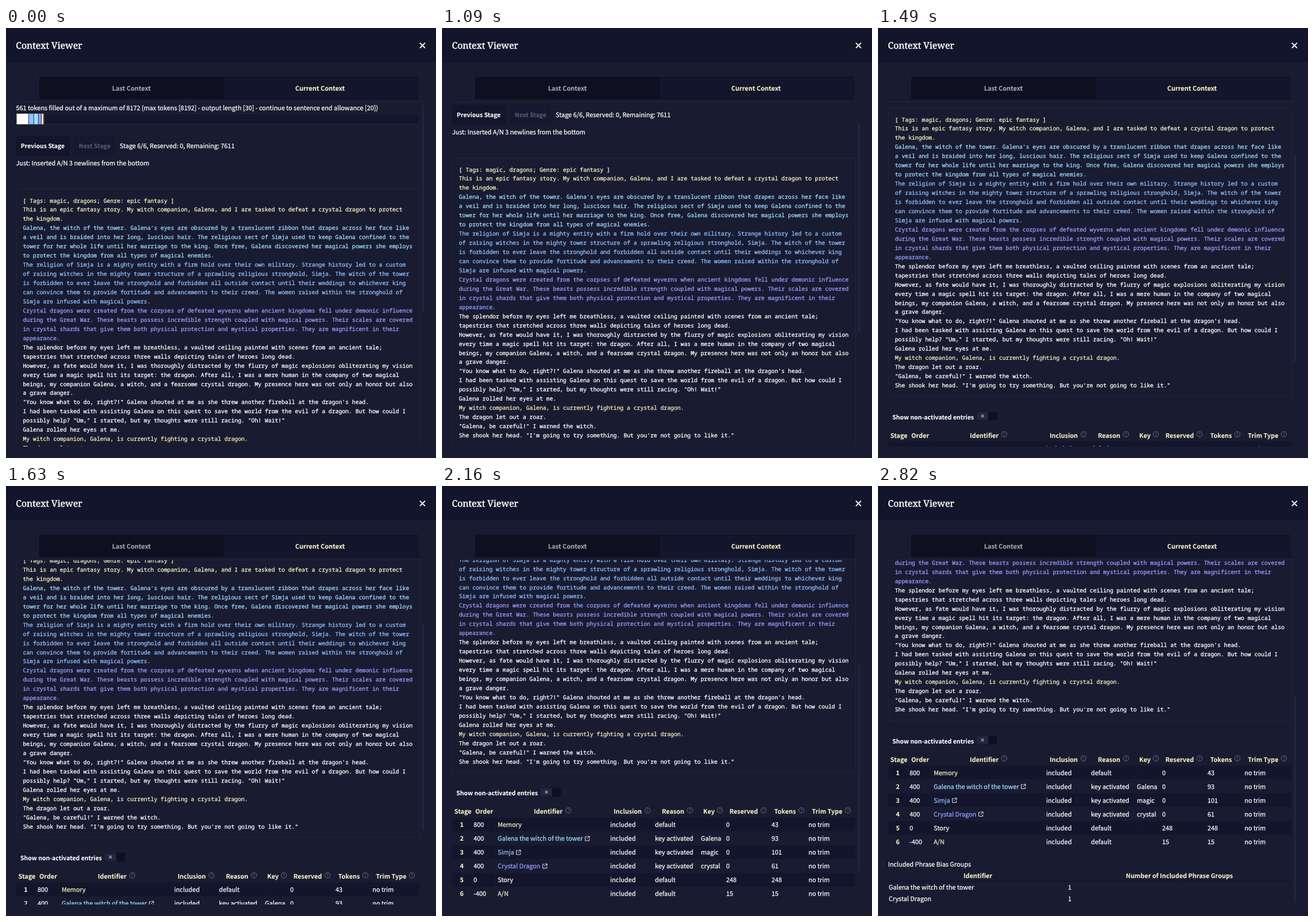
Animation, 749 px wide and 748 px high, one loop 3.52 s. Source, as an HTML page:

```html
<!DOCTYPE html>
<html lang="en">
<head>
<meta charset="utf-8">
<title>Context Viewer</title>
<style>
html, body { margin: 0; width: 100%; height: 100%; overflow: hidden; background: #191b31; }
svg { display: block; width: 100%; height: 100%; }
text {
  font: 10.88px "Noto Sans CJK JP", "Noto Sans CJK SC", "Noto Sans CJK", "Open Sans", sans-serif;
  stroke-width: 0.25px;
  text-rendering: geometricPrecision;
}
.mono { font: 9.758px "Noto Sans Mono", "DejaVu Sans Mono", monospace; stroke-width: 0.3px; }
.title { font: 15.8px "Noto Serif", serif; stroke-width: 0.45px; }
.semi { font-size: 10.5px; font-weight: 700; stroke-width: 0.1px; }
.tab { font-size: 11px; font-weight: 700; stroke-width: 0.1px; }
.head { font-weight: 700; stroke-width: 0.1px; }
.mid { text-anchor: middle; }
.hint { font-size: 7.5px; text-anchor: middle; stroke-width: 0; }
</style>
</head>
<body>
<svg id="stage" viewBox="0 0 749 748">
  <defs><clipPath id="view"><rect x="17" y="129" width="704.5" height="599"/></clipPath></defs>
</svg>
<script>
const BG = '#191b31', PANEL = '#13152c', DARK = '#0e0f21', LINE = '#22253f';
const CREAM = '#f5f3c2', SKY = '#9cdcff', BLUE = '#8fc0ff', INDIGO = '#979dff', NOTE = '#f2ebbd', WHITE = '#fff';

const stage = document.getElementById('stage');

function add(parent, tag, attrs, content) {
  const el = document.createElementNS('http://www.w3.org/2000/svg', tag);
  for (const k in attrs) el.setAttribute(k, attrs[k]);
  if (content !== undefined) el.textContent = content;
  parent.appendChild(el);
  return el;
}
const rect = (p, x, y, width, height, fill, more) =>
  add(p, 'rect', { x, y, width, height, fill, ...more });
const path = (p, d, stroke, width) =>
  add(p, 'path', { d, stroke, 'stroke-width': width, fill: 'none' });
const label = (p, x, y, str, cls = '', color = WHITE) =>
  add(p, 'text', { x, y, class: cls, fill: color, stroke: color }, str);

// Fixed chrome
rect(stage, 0, 0, 749, 748, BG);
rect(stage, 0, 0, 749, 60, PANEL);
label(stage, 17.3, 36, 'Context Viewer', 'title');
path(stage, 'M720.9 25.9l9 9m0-9l-9 9', WHITE, 2);
rect(stage, 58, 85, 320, 39, DARK);
rect(stage, 378, 85.5, 339.5, 38, PANEL, { stroke: DARK });
label(stage, 218.5, 108.8, 'Last Context', 'tab mid', '#a7a7ae');
label(stage, 547, 108.8, 'Current Context', 'tab mid', CREAM);
rect(stage, 17, 128, 714, 1, LINE);
const thumb = rect(stage, 724.5, 133, 3.5, 361, LINE, { rx: 1 });

const clip = add(stage, 'g', { 'clip-path': 'url(#view)' });
const page = add(clip, 'g', {});

// Token bar
label(page, 17.5, 142.5, '561 tokens filled out of a maximum of 8172 (max tokens [8192] - output length [30] - continue to sentence end allowance [20])');
rect(page, 18, 149, 702, 18.5, PANEL, { stroke: LINE });
let barX = 18.5;
for (const [tokens, color] of [[248, WHITE], [101, BLUE], [93, SKY], [61, INDIGO], [43, CREAM], [15, NOTE]]) {
  const w = tokens * 0.0865;
  rect(page, barX, 149, w, 18.5, DARK);
  rect(page, barX, 149, w - 0.8, 18.5, color);
  barX += w;
}

// Stage controls
rect(page, 17.5, 187, 94, 36, PANEL);
rect(page, 118, 187, 72, 36, '#161830');
label(page, 25.8, 208.8, 'Previous Stage', 'semi');
label(page, 126.8, 208.8, 'Next Stage', 'semi', '#5a5b6b');
label(page, 198, 208.8, 'Stage 6/6, Reserved: 0, Remaining: 7611');
label(page, 17.5, 238.6, 'Just: Inserted A/N 3 newlines from the bottom');

// Story
rect(page, 17.5, 280.5, 703, 501.5, BG, { stroke: LINE });
const story = [
  [CREAM, `[ Tags: magic, dragons; Genre: epic fantasy ]
This is an epic fantasy story. My witch companion, Galena, and I are tasked to defeat a crystal dragon to protect
the kingdom.`],
  [SKY, `Galena, the witch of the tower. Galena's eyes are obscured by a translucent ribbon that drapes across her face like
a veil and is braided into her long, luscious hair. The religious sect of Simja used to keep Galena confined to the
tower for her whole life until her marriage to the king. Once free, Galena discovered her magical powers she employs
to protect the kingdom from all types of magical enemies.`],
  [BLUE, `The religion of Simja is a mighty entity with a firm hold over their own military. Strange history led to a custom
of raising witches in the mighty tower structure of a sprawling religious stronghold, Simja. The witch of the tower
is forbidden to ever leave the stronghold and forbidden all outside contact until their weddings to whichever king
can convince them to provide fortitude and advancements to their creed. The women raised within the stronghold of
Simja are infused with magical powers.`],
  [INDIGO, `Crystal dragons were created from the corpses of defeated wyverns when ancient kingdoms fell under demonic influence
during the Great War. These beasts possess incredible strength coupled with magical powers. Their scales are covered
in crystal shards that give them both physical protection and mystical properties. They are magnificent in their
appearance.`],
  [WHITE, `The splendor before my eyes left me breathless, a vaulted ceiling painted with scenes from an ancient tale;
tapestries that stretched across three walls depicting tales of heroes long dead.
However, as fate would have it, I was thoroughly distracted by the flurry of magic explosions obliterating my vision
every time a magic spell hit its target: the dragon. After all, I was a mere human in the company of two magical
beings, my companion Galena, a witch, and a fearsome crystal dragon. My presence here was not only an honor but also
a grave danger.
"You know what to do, right?!" Galena shouted at me as she threw another fireball at the dragon's head.
I had been tasked with assisting Galena on this quest to save the world from the evil of a dragon. But how could I
possibly help? "Um," I started, but my thoughts were still racing. "Oh! Wait!"
Galena rolled her eyes at me.`],
  [NOTE, 'My witch companion, Galena, is currently fighting a crystal dragon.'],
  [WHITE, `The dragon let out a roar.
"Galena, be careful!" I warned the witch.
She shook her head. "I'm going to try something. But you're not going to like it."`]
];
let lineY = 303.5;
for (const [color, block] of story) {
  for (const line of block.split('\n')) {
    label(page, 29.5, lineY, line, 'mono', color);
    lineY += 15.95;
  }
}

// Toggle
label(page, 25, 821.6, 'Show non-activated entries', 'semi');
rect(page, 171, 808.5, 36, 15, DARK, { rx: 1 });
rect(page, 171.5, 809, 20.5, 14, LINE);
path(page, 'M179.6 813.4l4.8 4.8m0-4.8l-4.8 4.8', '#a9aab6', 1.3);

// Entry table
const heads = [
  ['Stage', 36.5], ['Order', 73.5], ['Identifier', 185, 220], ['Inclusion', 323.5, 358],
  ['Reason', 402.5, 432], ['Key', 465, 484], ['Reserved', 525.5, 560],
  ['Tokens', 597.5, 626], ['Trim Type', 671, 707]
];
for (const [name, x, hint] of heads) {
  label(page, x, 853.5, name, 'head mid', CREAM);
  if (!hint) continue;
  add(page, 'circle', { cx: hint, cy: 847.7, r: 4.7, fill: 'none', stroke: '#74747f', 'stroke-width': 0.9 });
  label(page, hint, 850.5, '?', 'hint', '#74747f');
}
const rows = [
  [800, 'Memory', CREAM, 'default', '', 0, 43],
  [400, 'Galena the witch of the tower', SKY, 'key activated', 'Galena', 0, 93, 253],
  [400, 'Simja', BLUE, 'key activated', 'magic', 0, 101, 133],
  [400, 'Crystal Dragon', INDIGO, 'key activated', 'crystal', 0, 61, 179],
  [0, 'Story', WHITE, 'default', '', 248, 248],
  [-400, 'A/N', NOTE, 'default', '', 15, 15]
];
rows.forEach(([order, name, color, reason, key, reserved, tokens, icon], i) => {
  const top = 860.7 + i * 24, y = top + 15.8;
  if (i % 2 === 0) {
    rect(page, 18, top, 702, 23.5, PANEL);
    for (const x of [53, 92, 291.5, 369.5, 449.5, 491.5, 571, 635.5]) rect(page, x, top, 1, 23.5, BG);
  }
  label(page, 34.5, y, i + 1, 'head mid', CREAM);
  label(page, 55, y, order);
  label(page, 97, y, name, '', color);
  if (icon) {
    path(page, `M${icon - 0.5} ${y - 7}h-3v7h7v-3m-3-4.6h3.5v3.5m0-3.5l-4.7 4.7`, '#e6e7ee', 1);
  }
  label(page, 293, y, 'included');
  label(page, 371, y, reason);
  label(page, 451, y, key);
  label(page, 495, y, reserved);
  label(page, 574, y, tokens);
  label(page, 638.3, y, 'no trim');
});

// Phrase groups
label(page, 17.5, 1036, 'Included Phrase Bias Groups');
label(page, 174, 1055.5, 'Identifier', 'head mid', CREAM);
label(page, 525, 1055.5, 'Number of Included Phrase Groups', 'head mid', CREAM);
rect(page, 18, 1061, 702, 1, DARK);
['Galena the witch of the tower', 'Crystal Dragon'].forEach((name, i) => {
  const y = 1076.3 + i * 19.5;
  label(page, 18.7, y, name);
  label(page, 334, y, '1', 'mid');
});

// Stepped scroll: [time in ms, offset]
const LOOP = 3520;
const steps = [
  [0, 0], [700, 11.5], [830, 22.5], [960, 35.5], [1090, 54], [1230, 81], [1360, 111],
  [1490, 141], [1630, 170.5], [1760, 199.5], [1890, 228.5], [2020, 256.5], [2160, 283.5],
  [2290, 308], [2420, 329.5], [2560, 347.5], [2690, 362.5], [2820, 374]
];
function draw(t) {
  const scroll = steps.filter(([at]) => at <= t).pop()[1];
  page.setAttribute('transform', `translate(0 ${-scroll})`);
  thumb.setAttribute('y', 133 + scroll * 0.617);
}
const start = performance.now();
function tick() {
  draw((performance.now() - start) % LOOP);
  requestAnimationFrame(tick);
}
tick();
</script>
</body>
</html>
```
